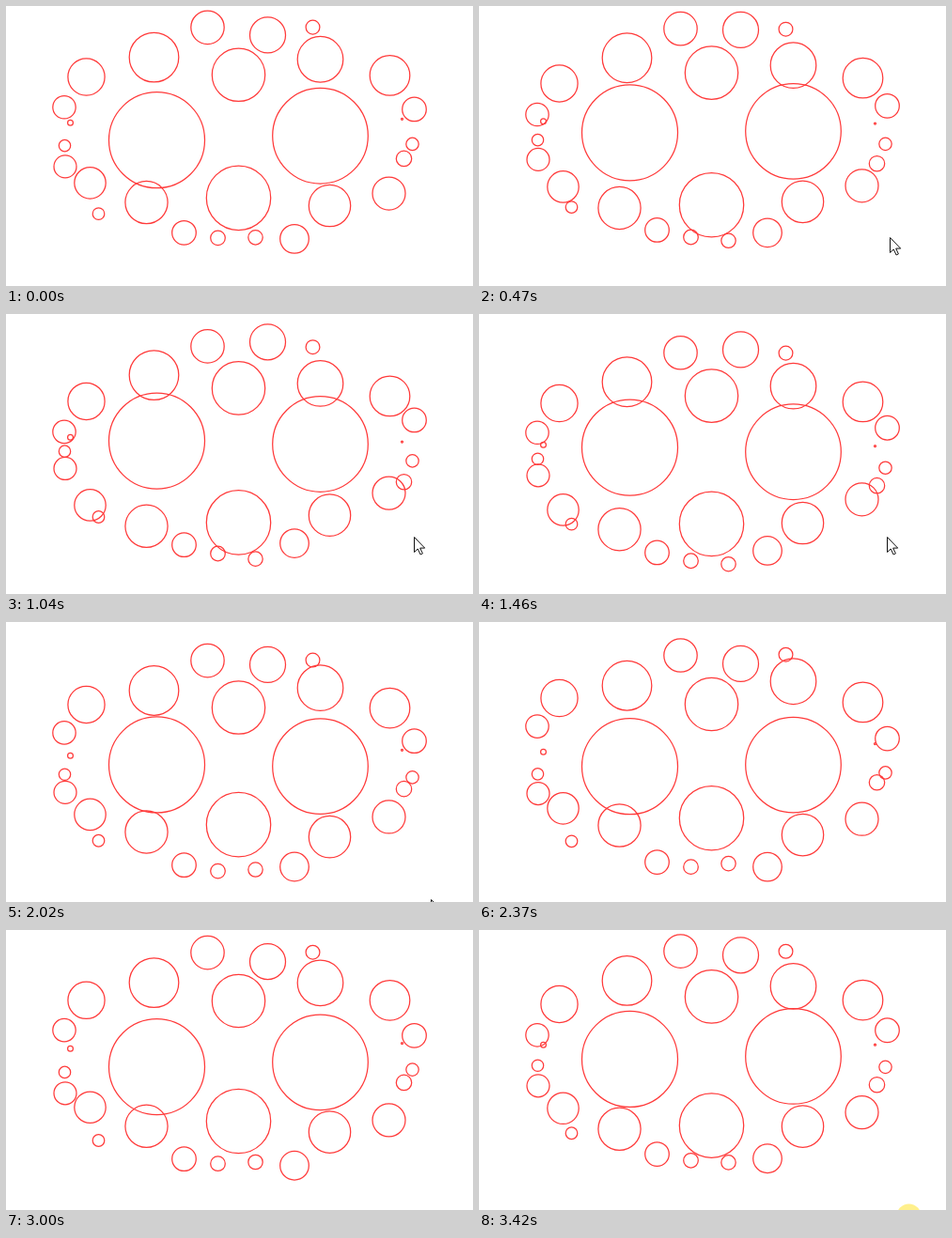
Animation of 497 by 298 pixels, one loop 3490 ms. Source, as an HTML page with a canvas:

```html
<!DOCTYPE html>
<html lang="en">
<head>
<meta charset="utf-8">
<title>Bobbing circles</title>
<style>
  html, body { margin: 0; width: 100%; height: 100%; overflow: hidden; background: #fff; }
  canvas { display: block; }
</style>
</head>
<body>
<canvas id="stage" width="497" height="298"></canvas>
<script>
const ctx = document.getElementById('stage').getContext('2d');
const LOOP = 3490, SWING = 10.2, SPEED = 0.002, LAG = 0.078;

// x, middle y, radius; each circle swings LAG ahead of the one before
const circles = [
  [407, 199, 17.5], [160, 143, 51], [62.5, 172, 12], [98, 223, 6.3],
  [306.5, 250.5, 15.3], [62, 152, 6.2], [278, 35, 19], [334, 143, 50.8],
  [344, 218, 22.2], [434, 116, 12.8], [189, 248, 12.8], [247, 80.5, 28.2],
  [68, 132, 2.9], [225, 255, 7.8], [432, 155.5, 6.7], [157, 63.5, 26.3],
  [214, 32, 17.7], [326, 32, 7.4], [408, 83.5, 21.3], [265, 256, 7.7],
  [89, 198, 16.7], [421, 130, 1], [423, 172, 8.2], [149, 218.5, 22.6],
  [334, 66, 24.3], [85, 84.5, 19.6], [247, 213, 34.2], [61.5, 116, 12.2]
];

// The picture holds for about 70 ms at a time, a little less at the start
const hold = (t, step) => Math.floor(t / step) * step;
const tick = t => t < 620 ? Math.min(540, hold(t, 67)) : 620 + hold(t - 620, 70);

function ring(x, y, r) {
  ctx.beginPath();
  ctx.arc(x, y, r, 0, Math.PI * 2);
}

// The pointer slides in from below, rests, then slides back out
function pointer(t) {
  const away = Math.max(0, 500 - t, t - 1810) / 230;
  ctx.save();
  ctx.translate(Math.round(434 + 20 * away), Math.round(237 + 64 * away));
  ctx.fillStyle = '#fff';
  ctx.strokeStyle = '#111';
  ctx.lineWidth = 1;
  const arrow = new Path2D('M0 0V16L3.7 12.5 6.6 18.5 8.9 17.4 6.2 11.6H11.2Z');
  ctx.fill(arrow);
  ctx.stroke(arrow);
  ctx.restore();
}

function draw(t) {
  ctx.setTransform(1, 0, 0, 1, 0, 0);
  ctx.clearRect(0, 0, 497, 298);
  ctx.translate(.5, .5);
  ctx.strokeStyle = '#ff3a3a';
  ctx.lineWidth = 1.25;
  circles.forEach(([x, y, r], i) => {
    ring(x, y - SWING * Math.sin(t * SPEED + i * LAG), r);
    ctx.stroke();
  });
  if (t >= 3200) {
    ring(457, 304, 13);
    ctx.fillStyle = '#fff08c';
    ctx.fill();
  }
  pointer(t);
}

const start = performance.now();
function run() {
  draw(tick((performance.now() - start) % LOOP));
  requestAnimationFrame(run);
}
run();
</script>
</body>
</html>
```
